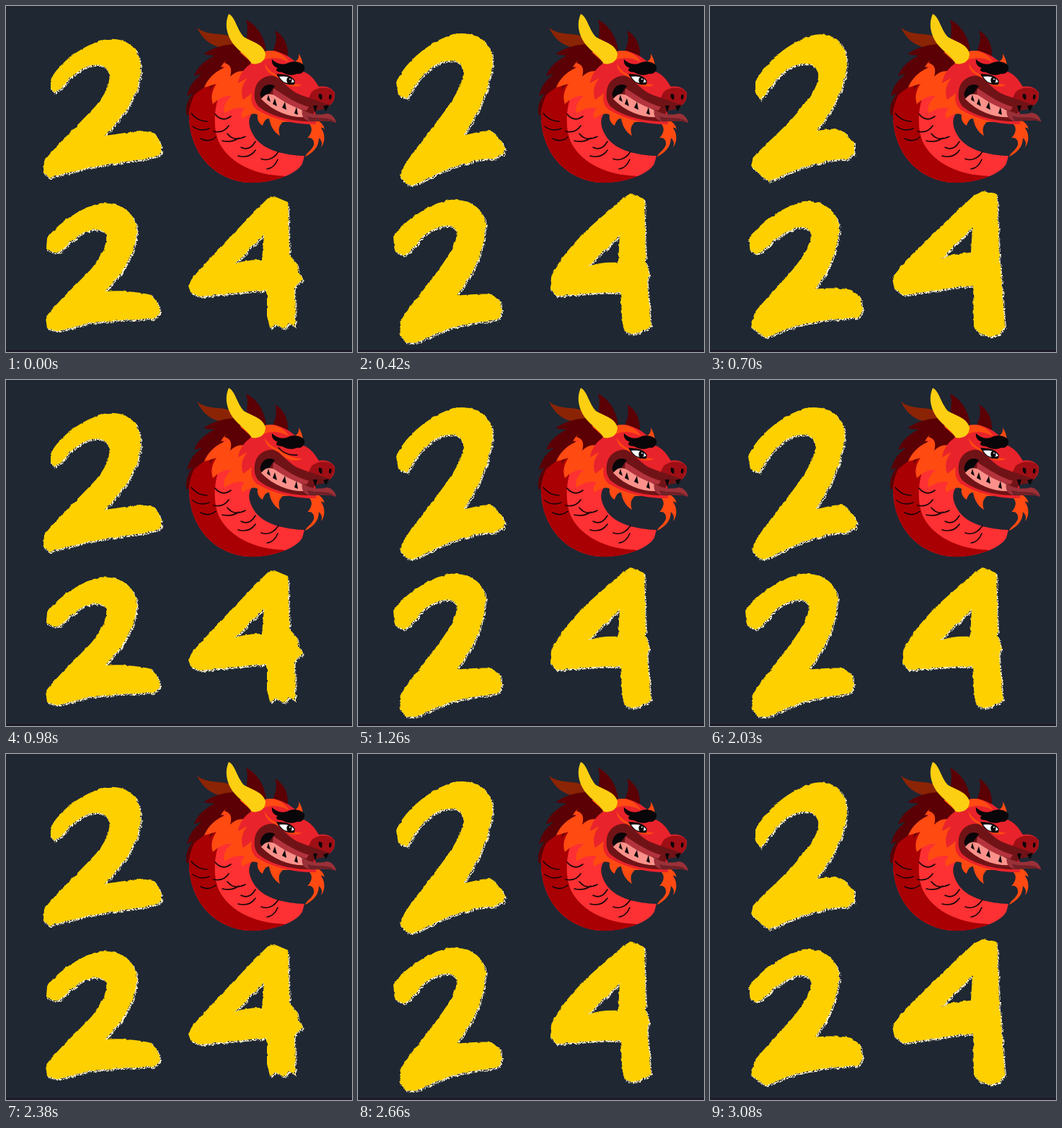
An HTML page that plays this animation: 480 px wide and 480 px high, repeating every 3.15 s.

```html
<!DOCTYPE html>
<html lang="en">
<head>
<meta charset="utf-8">
<title>Year of the dragon</title>
<style>
html, body { margin: 0; width: 100%; height: 100%; overflow: hidden; background: #1f2733; }
svg { display: block; width: 100vw; height: 100vh; }
.pose { visibility: hidden; }
.pose.on { visibility: visible; }
.body { fill: #fd3033; }
.face { fill: #e9232b; }
.shade { fill: #a90004; }
.maroon { fill: #5b0005; }
.orange { fill: #ff4a12; }
.ink { fill: #080609; }
.line { fill: none; stroke: #16060a; stroke-width: 1.6; stroke-linecap: round; }
</style>
</head>
<body>
<svg viewBox="0 0 480 480">
  <defs>
    <filter id="rough" x="-10%" y="-10%" width="120%" height="120%" color-interpolation-filters="sRGB">
      <feTurbulence type="fractalNoise" baseFrequency=".14" numOctaves="2" seed="4"/>
      <feDisplacementMap in="SourceGraphic" scale="3.5" xChannelSelector="R" yChannelSelector="G"/>
    </filter>
    <filter id="dry" x="-10%" y="-10%" width="120%" height="120%" color-interpolation-filters="sRGB">
      <feTurbulence type="fractalNoise" baseFrequency=".14" numOctaves="2" seed="4" result="wave"/>
      <feDisplacementMap in="SourceGraphic" in2="wave" scale="5" xChannelSelector="R" yChannelSelector="G" result="edge"/>
      <feTurbulence type="fractalNoise" baseFrequency=".5" numOctaves="2" seed="2"/>
      <feColorMatrix values="0 0 0 0 0  0 0 0 0 0  0 0 0 0 0  7 0 0 0 -2.7" result="grain"/>
      <feComposite in="edge" in2="grain" operator="in"/>
    </filter>
  </defs>

  <rect width="480" height="480" fill="#1f2733"/>
  <rect y="477" width="480" height="3" fill="#1d1a29"/>
  <g id="digits"></g>

  <g id="dragon">
    <!-- hair and far horn -->
    <path class="maroon" d="M333 19C346 25 358 40 361 62L336 54C331 44 338 33 333 19ZM373 34C385 40 392 54 391 70L370 63C374 54 377 44 373 34Z"/>
    <path fill="#8b2405" d="M265 30C279 42 298 36 314 43L320 59L300 58C283 55 272 45 265 30Z"/>
    <path class="maroon" d="M335 55C315 50 290 55 274 67L289 69C275 76 265 85 261 97L272 94C260 103 254 112 251 125L259 121C251 132 248 142 251 152L275 140L333 78Z"/>

    <!-- coiled body -->
    <path class="body" d="M310 78C278 88 254 124 254 156C256 205 289 241 335 245C372 246 403 233 411 219L414 208C388 207 358 201 345 182C337 170 334 158 342 148L350 100Z"/>
    <path class="shade" d="M299 86C270 98 254 128 254 156C256 205 289 241 335 245C356 246 373 242 388 236C344 235 311 217 297 192C286 171 287 135 303 108Z"/>
    <path class="maroon" d="M297 79C279 89 262 104 257 128C266 118 275 113 285 106L282 117C290 106 299 100 310 96Z"/>
    <path class="line" d="M257 149q9 11 22 11M259 167q10 8 23 3M270 184q11 6 21-2M290 150q10 12 22 3M288 174q14 3 21-8M307 177q9 12 25 4M300 187q14 3 23-4M326 196q12 6 20-8M322 208q16 4 24-8M354 212q14 5 24-10M362 226q10-1 15-13"/>

    <!-- mane -->
    <path class="orange" d="M337 62C320 63 305 72 298 85L309 83C291 89 280 100 275 113L292 108C285 118 284 127 287 136C297 127 304 124 313 125C304 132 301 140 303 149C314 142 322 140 331 142C326 148 325 152 328 156C341 148 345 149 349 151C348 158 351 163 356 166C358 159 361 156 365 156C367 168 373 176 380 180C377 170 379 166 384 161L417 160L386 82Z"/>
    <path class="maroon" d="M316 57L340 78L337 92C326 88 318 91 311 98C314 88 312 81 303 79Z"/>
    <path class="face" d="M341 79C331 86 324 94 322 107L335 100C327 109 325 120 329 130L341 121C339 130 341 139 349 145L372 118L375 79Z"/>
    <path class="orange" d="M397 79C405 76 407 72 406 66C412 75 413 83 410 94ZM414 160C429 165 424 178 418 183C425 182 428 187 427 193C423 202 418 202 415 209C427 203 434 195 434 183C440 188 438 194 437 196C443 189 443 177 437 169C439 168 441 170 442 171C440 162 434 159 426 157Z"/>

    <!-- head -->
    <path class="face" d="M339 80C348 66 363 58 378 64C391 68 405 77 410 90C423 94 429 104 434 112C442 110 452 113 456 120C457 131 452 139 441 140L429 145L430 164C402 165 370 157 350 145C339 134 342 115 352 103Z"/>
    <path class="orange" d="M356 64C372 58 385 66 393 78C380 71 368 70 358 75ZM359 80C359 90 368 96 379 100C386 110 400 115 411 109C398 109 388 104 382 97C371 95 364 89 359 80Z"/>
    <path fill="#9f0f15" d="M424 119C433 112 447 111 455 119C458 129 451 139 442 140C434 138 427 133 420 127Z"/>
    <path fill="#701317" d="M345 119C346 104 359 95 372 97C385 103 392 117 408 123C424 129 440 134 450 138L438 144L429 145L421 160C396 160 366 153 350 139C345 133 344 126 345 119Z"/>
    <path class="ink" d="M354 118C357 109 366 107 373 111L365 122L355 128C352 124 352 121 354 118Z"/>
    <path fill="#fb918a" d="M354 129C360 121 366 121 373 124C388 130 399 139 412 145L420 154C396 156 373 148 354 129Z"/>
    <path fill="#b3333d" d="M371 114C386 124 402 135 420 140L417 145C400 141 386 134 370 122Z"/>
    <path class="ink" d="M362 130L364 123L367 133ZM370 136L373 128L376 139ZM383 141L387 133L389 144ZM400 149L403 140L405 151ZM426 138L432 138L429 148ZM440 139L448 137L444 146Z"/>
    <g id="tongue">
      <path fill="#9a3038" d="M411 143C421 151 435 152 445 149C453 150 457 156 458 162C445 157 433 161 421 160C414 158 409 153 411 143Z"/>
      <path fill="#712027" d="M418 153C433 158 445 151 458 162C445 157 433 161 421 160Z"/>
    </g>
    <path class="ink" d="M434 122C438 121 440 124 438 130C435 130 433 126 434 122ZM449 123C452 122 453 126 450 130C448 130 447 127 449 123Z"/>

    <!-- eye -->
    <g id="open">
      <path class="ink" d="M375 94C383 95 395 94 401 104L400 109C388 111 380 104 375 94Z"/>
      <path fill="#fff" d="M379 98C387 97 396 98 400 105C390 110 383 105 379 98Z"/>
      <ellipse class="ink" cx="393" cy="103" rx="3.6" ry="4.5"/>
      <circle cx="394" cy="101.500" r="1" fill="#fff"/>
    </g>
    <path id="shut" class="line" d="M378 94C384 101 393 105 404 104"/>
    <path class="ink" d="M369 74C375 80 382 82 389 80C398 75 408 76 414 83C415 90 411 95 404 94C397 97 389 96 383 92C377 92 372 89 377 86C371 84 368 79 369 74Z"/>

    <!-- near horn -->
    <path fill="#fdcf12" d="M309 11C318 15 320 32 330 43C342 50 357 53 360 66C360 76 352 82 341 80C334 68 318 60 311 46C305 34 304 22 309 11Z"/>
  </g>
</svg>
<script>
// Three brush drawings: upper two, lower two, four.
const drawings = [[
  "M62 102C72 82 100 57 135 47C165 41 188 58 187 88C186 118 164 152 137 180L165 176C185 173 200 173 208 178L213 190L217 194L213 206C200 213 180 213 150 218C115 224 85 231 60 238L52 230L53 215C70 193 105 160 125 138C140 120 145 105 143 94C140 79 122 79 108 86C94 93 85 104 77 114L68 120L62 114Z",
  "M57 322C72 302 100 282 128 274C158 271 181 285 181 314C179 345 158 375 137 396C160 394 185 397 202 401L209 410L214 424L207 433C180 436 145 434 110 441L72 451L57 447L55 432C70 412 100 384 118 365C135 345 140 330 139 320C137 308 122 308 108 314C95 320 85 332 76 340L67 343L56 336Z",
  "M343 287L363 267L372 264L391 272L393 345L404 358L406 370L411 379L400 391L401 444L392 440L385 447L375 442L366 446L362 430L362 394C330 396 298 400 268 403L256 397L253 387L264 371C290 342 317 314 343 287ZM358 317L317 358C329 353 342 352 355 352Z"
], [
  "M53 106C65 78 98 50 132 39C165 34 188 50 187 79C183 113 166 149 147 179C160 177 170 173 182 173L194 180L199 188L204 196L201 205L189 211C155 212 120 227 75 249L66 246L58 235C64 216 90 187 106 165C126 139 147 110 146 90C143 72 125 74 110 80C93 89 83 105 73 119L68 128L56 124Z",
  "M49 320C65 297 95 277 126 269C156 266 178 282 177 309C174 343 157 374 137 402C154 400 170 399 186 400L196 409L200 421L196 434C170 439 138 440 108 455L80 467L67 467L58 457L60 434C76 410 102 382 118 357C132 337 139 321 136 311C131 300 115 305 104 310C91 317 82 328 72 341L64 347L51 340Z",
  "M341 290L367 267L378 260L397 268L399 355L405 373L401 381L405 433L407 443L397 450L380 455L370 451L367 440L364 397C330 397 303 400 275 402L267 392L268 376C279 350 308 317 341 290ZM363 318L320 361C333 356 347 355 361 356Z"
], [
  "M63 105C78 78 108 50 145 40C174 35 191 56 190 82C186 114 168 148 148 173L174 170L190 178L200 190L200 205L190 212C160 212 124 224 82 243L70 235L57 222L60 210C77 191 104 169 122 147C140 126 152 109 150 93C145 76 128 78 114 84C98 92 87 107 77 122L70 130L63 120Z",
  "M53 324C70 300 98 280 129 271C159 269 180 286 179 314C174 346 163 370 145 393C163 391 181 391 196 394L208 403L211 421L207 432C174 434 139 436 104 449L78 460L70 455L57 445L62 425C78 405 104 380 120 359C135 339 142 325 139 313C134 304 120 306 108 312C94 319 84 329 74 339L65 345L56 339Z",
  "M341 286L366 263L378 257L398 260L401 345L404 370L407 420L409 444L402 455L388 459L373 453L366 445L365 388C331 390 300 397 268 401L256 392L253 378L264 362C287 339 314 311 341 286ZM364 307L320 351C333 345 347 343 362 342Z"
]];

const byId = id => document.getElementById(id);
byId("digits").innerHTML = drawings.map(shapes => {
  const d = shapes.join("");
  return `<g class="pose" fill-rule="evenodd">
    <path d="${d}" fill="#fff5cf" stroke="#fff5cf" transform="translate(1.5 2)" filter="url(#dry)"/>
    <path d="${d}" fill="#ffd000" filter="url(#rough)"/>
  </g>`;
}).join("");

const poses = document.querySelectorAll(".pose");
const tongue = byId("tongue"), openEye = byId("open"), shutEye = byId("shut");
const TICK = 70, TICKS = 45, HOLD = 3.75;

function draw(time) {
  const tick = Math.floor(time / TICK) % TICKS;
  const pose = Math.floor(tick / HOLD) % 3;
  const blink = tick >= 13 && tick < 16;
  poses.forEach((el, i) => el.classList.toggle("on", i === pose));
  openEye.style.display = blink ? "none" : "";
  shutEye.style.display = blink ? "" : "none";
  tongue.setAttribute("transform", pose === 2 ? "rotate(-2 415 150) translate(1 0)" : "");
}

const start = performance.now();
function loop() {
  draw(performance.now() - start);
  requestAnimationFrame(loop);
}
loop();
</script>
</body>
</html>
```
